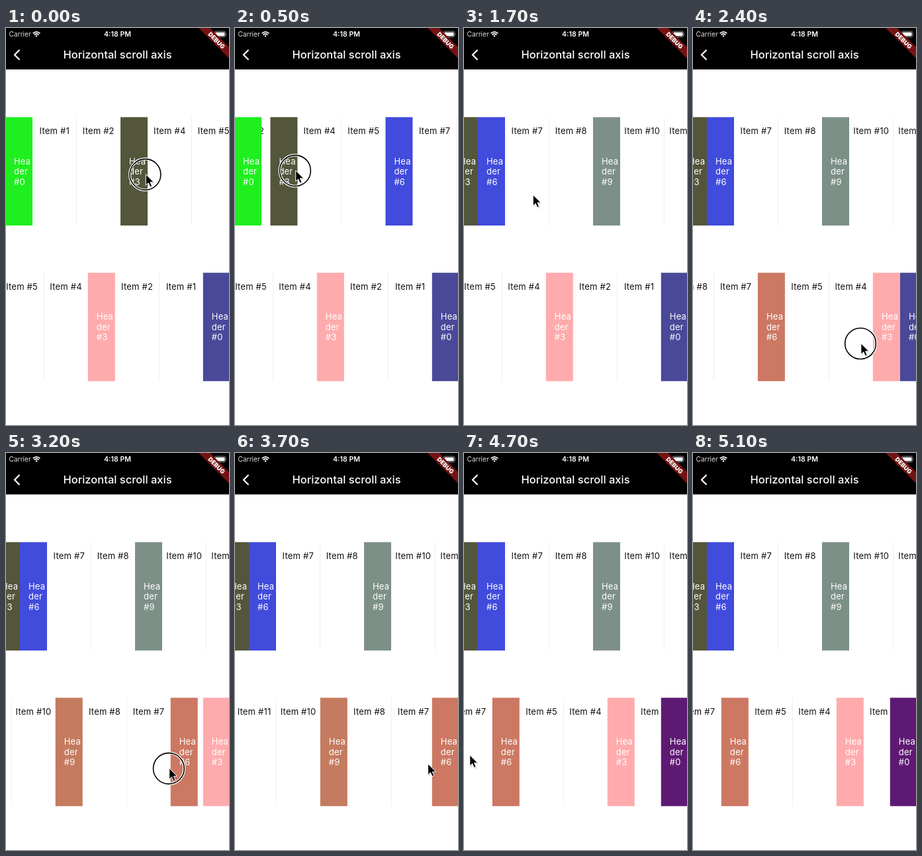
Animation, 337 px wide and 599 px high, one loop 5.2 s. Source, as an HTML page:

```html
<!DOCTYPE html>
<html lang="en">
<head>
<meta charset="utf-8">
<title>Horizontal scroll axis</title>
<style>
html, body { margin: 0; width: 100%; height: 100%; overflow: hidden; background: #fff; }
svg { display: block; font-family: Inter, Roboto, sans-serif; }
.row { font-size: 13px; letter-spacing: .2px; }
</style>
</head>
<body>
<svg width="337" height="599" viewBox="0 0 337 599">
  <rect width="337" height="599" fill="#fff"/>
  <g id="top" class="row"></g>
  <g id="bottom" class="row"></g>

  <rect width="337" height="62.5" fill="#000"/>
  <g fill="#fff">
    <text x="4.5" y="13" font-size="10.2" fill="#ddd">Carrier</text>
    <text x="168.5" y="13.2" font-size="10.6" font-weight="600" text-anchor="middle">4:18 PM</text>
    <text x="168.5" y="46" font-size="16.5" font-weight="500" text-anchor="middle">Horizontal scroll axis</text>
  </g>
  <g fill="none" stroke="#fff">
    <path d="M40.6 8.2Q46 3.4 51.4 8.2M42.5 10.3Q46 7.2 49.5 10.3" stroke-width="1.7"/>
    <path d="M46 13.2l-1.2-1.3q1.2-.9 2.4 0z" fill="#fff"/>
    <path d="M20.5 33L13 40.5l7.5 7.5" stroke-width="2.2"/>
  </g>
  <rect x="315" y="5" width="17" height="8.6" rx="2.4" fill="none" stroke="#999" stroke-width=".9"/>
  <rect x="316.4" y="6.4" width="14.2" height="5.8" rx="1.2" fill="#fff"/>
  <path d="M333.2 8v2.8q1.2-1.4 0-2.8z" fill="#999"/>
  <g transform="translate(337 0) rotate(45)">
    <rect x="-36" y="20.2" width="72" height="12.2" fill="#751313"/>
    <text y="29.8" font-size="9" font-weight="900" text-anchor="middle" fill="#fff">DEBUG</text>
  </g>

  <g id="pointer">
    <g id="ring" fill="none">
      <circle r="23.4" stroke="#fff" stroke-width="4"/>
      <circle r="23.4" stroke="#000" stroke-width="1.6"/>
    </g>
    <path d="M2 1.5v17l4-3.8 2.6 6 3-1.3L9 13.5h5.4z" opacity=".15"/>
    <path d="M.8-.3v16.6l3.8-3.6 2.6 6 2.9-1.2-2.6-5.8h5.3z" stroke="#fff"/>
  </g>
</svg>
<script>
const LOOP = 5200, STEP = 100, REST = 60;
const HEAD = 41, ITEM = 66.5, GROUP = HEAD + 2 * ITEM, ROW_H = 163.5;
const $ = id => document.getElementById(id);

function add(parent, tag, attrs, text) {
  const el = document.createElementNS('http://www.w3.org/2000/svg', tag);
  for (const k in attrs) el.setAttribute(k, attrs[k]);
  if (text) el.textContent = text;
  parent.appendChild(el);
  return el;
}
const move = (el, x, y = 0) => el.setAttribute('transform', `translate(${x} ${y})`);
const mix = (a, b, u) => a + (b - a) * u;

function ease(t, a, b) {
  const u = Math.min(1, Math.max(0, (t - a) / (b - a)));
  return u * u * (3 - 2 * u);
}

// A row of groups: one sticky header, pinned at pin, followed by two items.
function makeRow(id, y, pin, dir, colors) {
  const items = add($(id), 'g'), heads = add($(id), 'g');
  const groups = colors.map((fill, g) => {
    const body = add(items, 'g');
    for (let i = 0; i < 2; i++) {
      const x = dir > 0 ? HEAD + i * ITEM : -(i + 1) * ITEM;
      add(body, 'text', { x: x + ITEM / 2, y: y + 25.3, 'text-anchor': 'middle', fill: '#111' },
        'Item #' + (g * 3 + i + 1));
    }
    add(body, 'rect', { x: (dir > 0 ? HEAD + ITEM : -ITEM) - .5, y, width: 1, height: ROW_H, fill: '#eee' });
    const head = add(heads, 'g');
    const box = add(head, 'rect', { y, width: HEAD, height: ROW_H, fill });
    ['Hea', 'der', '#' + g * 3].forEach((s, i) =>
      add(head, 'text', { x: 13, y: y + 71 + i * 15.5, fill: '#fff' }, s));
    return { body, head, box };
  });
  const place = scroll => groups.forEach(({ body, head }, g) => {
    const d = g * GROUP - scroll;
    move(body, pin + dir * d);
    move(head, pin + dir * Math.min(Math.max(d, 0), d + GROUP - HEAD));
  });
  return { dir, place, first: groups[0].box };
}

const upper = makeRow('top', 134.5, -1, 1, ['#1fef1f', '#53563a', '#414bdc', '#7d9087']);
const lower = makeRow('bottom', 369.3, 297.8, -1, ['#4a4898', '#ffabad', '#cc7863', '#c47b5f']);

// Each drag scrolls its row by the distance the pointer travels.
const drag = (row, start, end, x0, x1, y0, y1 = y0) => ({ row, start, end, x0, x1, y0, y1 });
const DRAGS = [
  drag(upper, 0, 840, 210.5, 24, 221, 212),
  drag(upper, 1150, 1640, 243, 103.5, 252),
  drag(lower, 1900, 2545, 105, 275, 470, 477),
  drag(lower, 2800, 3425, 117, 300, 476),
  drag(lower, 4154, 4640, 268, 8, 453, 456)
];
const EXIT = { start: 5000, x0: 40, y0: 710 };

function pointerAt(t) {
  const i = DRAGS.findLastIndex(d => t >= d.start);
  const d = DRAGS[i], next = DRAGS[i + 1] || EXIT;
  const pull = ease(t, d.start, d.end);
  const glide = ease(t, d.end + REST, next.start - REST);
  return {
    x: mix(mix(d.x0, d.x1, pull), next.x0, glide),
    y: mix(mix(d.y0, d.y1, pull), next.y0, glide),
    down: t < d.end
  };
}

const scrollAt = (row, t) => DRAGS.filter(d => d.row === row)
  .reduce((sum, d) => sum + row.dir * (d.x0 - d.x1) * ease(t, d.start, d.end), 0);

function draw(t) {
  for (const row of [upper, lower]) row.place(scrollAt(row, t));
  // The first header gets a new colour when it is rebuilt on the way back.
  lower.first.setAttribute('fill', t < DRAGS[4].start ? '#4a4898' : '#5e1a72');
  const p = pointerAt(t);
  move($('pointer'), p.x, p.y);
  $('ring').setAttribute('visibility', p.down ? 'visible' : 'hidden');
}

const begin = performance.now();
function tick() {
  const t = (performance.now() - begin) % LOOP;
  draw(Math.floor(t / STEP) * STEP);
  requestAnimationFrame(tick);
}
draw(0);
requestAnimationFrame(tick);
</script>
</body>
</html>
```
